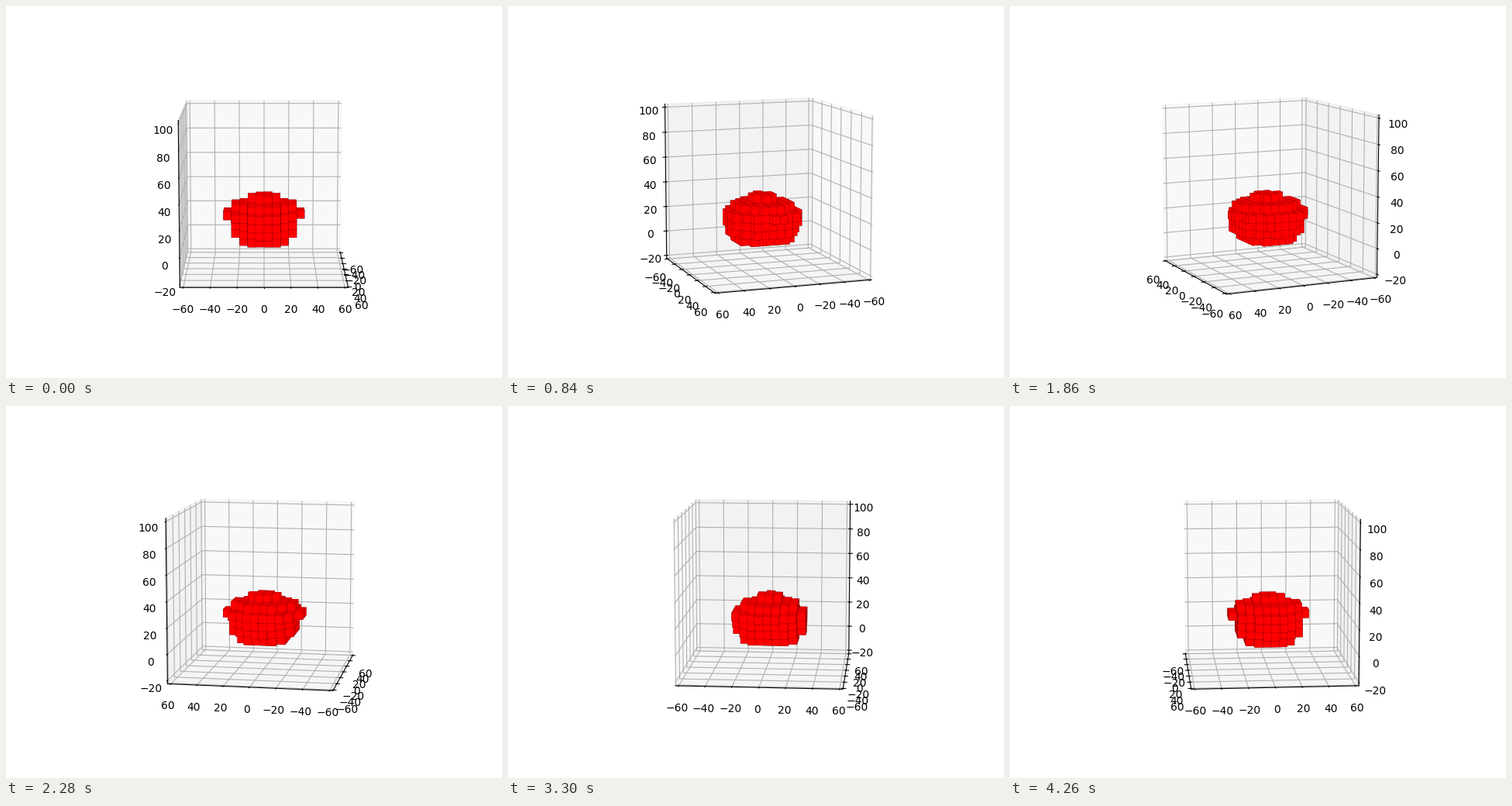
Animation of 640 by 480 pixels, one loop 4320 ms. Source, as a matplotlib script:

```python
import itertools

import numpy as np
import matplotlib.pyplot as plt
from matplotlib.animation import FuncAnimation
from mpl_toolkits.mplot3d.art3d import Poly3DCollection

FRAMES = 72
INTERVAL = 60
CELL = 6.25
CENTER = 0.45, -0.05
RADII = 3.43, 4.13, 4.4, 4.66, 3.75, 1.7  # profile from bottom to top, in cells


def build_cells():
    """Stack one disc of cubes per radius."""
    cx, cy = CENTER
    return {
        (x, y, z)
        for z, r in enumerate(RADII)
        for x, y in itertools.product(range(-5, 6), repeat=2)
        if np.hypot(x + 0.5 - cx, y + 0.5 - cy) <= r
    }


def outer_faces(cells):
    """Return the squares between a filled cell and an empty neighbour."""
    faces = []
    for cell in sorted(cells):
        for axis, side in itertools.product(range(3), (0, 1)):
            near = list(cell)
            near[axis] += 2 * side - 1
            if tuple(near) in cells:
                continue
            u, v = np.eye(3)[[(axis + 1) % 3, (axis + 2) % 3]]
            p = np.array(cell, float)
            p[axis] += side
            faces.append(CELL * np.array([p, p + u, p + u + v, p + v]))
    return faces


fig = plt.figure(figsize=(6.4, 4.8), dpi=100)
ax = fig.add_subplot(projection="3d")
ax.add_collection3d(Poly3DCollection(
    outer_faces(build_cells()),
    facecolors="red", edgecolors="black", linewidths=0.1))

ax.set_xticks(range(-60, 61, 20))
ax.set_yticks(range(-60, 61, 20))
ax.set_zticks(range(-20, 101, 20))
ax.set_xlim(-62.5, 62.5)
ax.set_ylim(-62.5, 62.5)
ax.set_zlim(-22.5, 102.5)
# The zoom makes 120 data units exactly one view unit.
ax.set_box_aspect((1, 1, 1), zoom=np.sqrt(3) / 1.8294640721620434)


def update(i):
    # The tiny offset keeps edge-on views from flickering between sides.
    ax.view_init(elev=10, azim=i * 360 / FRAMES + 1e-3)
    return []


anim = FuncAnimation(fig, update, frames=FRAMES, interval=INTERVAL,
                     init_func=lambda: update(0), repeat=True)
plt.show()
```
